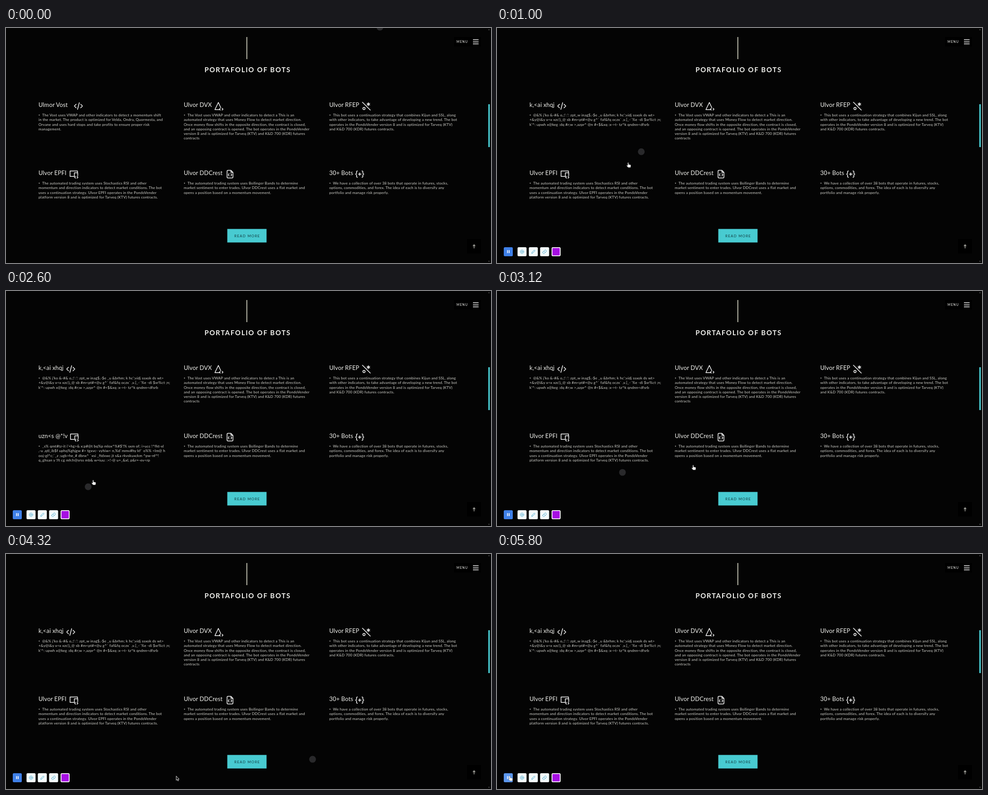
An HTML page that plays this animation: 1075 px wide and 521 px high, repeating every 5840 ms.

```html
<!DOCTYPE html>
<html lang="en">
<head>
<meta charset="utf-8">
<title>Portafolio of bots</title>
<style>
html, body { margin: 0; width: 100%; height: 100%; overflow: hidden; background: #040404; }
svg { display: block; }
text { font-family: Lato, "Open Sans", sans-serif; fill: #f2f2ee; white-space: pre; }
.title { font-size: 13px; letter-spacing: .15px; }
.line { font-size: 8.2px; letter-spacing: .19px; fill: #d6d6d0; }
.icon, .tool { fill: none; stroke: #fff; stroke-width: 1.5; stroke-linejoin: round; stroke-linecap: round; }
.tool { stroke: #4aa6cc; stroke-width: 1; }
</style>
</head>
<body>
<svg width="1075" height="521" viewBox="0 0 1075 521">
  <rect width="1075" height="521" fill="#040404"/>
  <circle id="dot" r="7.5" fill="#29292b"/>
  <rect x="533" y="20" width="1.6" height="49" fill="#e6e6d2"/>
  <text x="440" y="98" font-size="15" font-weight="700" letter-spacing="1.72">PORTAFOLIO OF BOTS</text>

  <rect x="993" y="20" width="60" height="21"/>
  <text x="998.5" y="33" font-size="7" letter-spacing="1.15">MENU</text>
  <path d="M1035 26.2h12.5M1035 30.7h12.5M1035 35.2h12.5" stroke="#fff" stroke-width="1.5"/>

  <g id="cards"></g>

  <rect x="490.5" y="445.5" width="87" height="30" fill="#48cbd1"/>
  <text x="506" y="463.5" font-size="8" letter-spacing="1.2" style="fill:#123c40">READ MORE</text>

  <rect x="1022" y="468" width="31" height="32"/>
  <path d="M1037.5 488.5v-7M1035 483.5l2.5-3 2.5 3" fill="none" stroke="#a2a29c" stroke-width="1.6"/>
  <rect x="1069" y="169" width="3.4" height="95" fill="#48cbd1"/>
  <path d="M1069 4.5l1.5-2 1.5 2zM1069 516.5l1.5 2 1.5-2z" fill="#777"/>

  <g id="tools">
    <rect id="pause" x="15" y="486" width="20" height="20" rx="2.5"/>
    <path d="M23.4 492.5v6.5M27 492.5v6.5" stroke="#fff" stroke-width="1.8"/>
    <g fill="#f3fbfc">
      <rect x="45.5" y="486" width="20" height="20" rx="2.5"/>
      <rect x="70.5" y="486" width="20" height="20" rx="2.5"/>
      <rect x="95.5" y="486" width="20" height="20" rx="2.5"/>
    </g>
    <g class="tool">
      <circle cx="55.5" cy="496" r="4" stroke-dasharray="2 1.2"/>
      <circle cx="55.5" cy="496" r="1.7"/>
      <path d="M77 499.5l.6-2.4 5-5 1.8 1.8-5 5z"/>
      <path d="M101.5 497l4.6-4.6q1-.8 2 0l1.2 1.2q.8 1 0 2l-4.6 4.2q-1 .8-2 0l-1.2-1q-.8-.9 0-1.8zM104 494.6l3 3"/>
    </g>
    <rect x="121.9" y="486.9" width="18.2" height="18.2" rx="2" fill="#a60fe2" stroke="#fff" stroke-width="1.8"/>
  </g>

  <path id="arrow" d="M0 0v9.6l2.2-2 1.5 3.4 1.5-.7-1.5-3.2h2.9z" fill="#111" stroke="#eee" stroke-width=".9"/>
  <path id="hand" d="M-1 1q0-1 .9-1t.9 1v3.2l4 .8q1.2.3 1.1 1.5l-.7 4.5h-5.4L-3.3 7.2q-.3-1.2.8-1.1L-1 7z" fill="#fff" stroke="#222" stroke-width=".4"/>
</svg>
<script>
const LOOP = 5840, $ = id => document.getElementById(id);

const add = (parent, tag, attrs, text = '') => {
  const e = document.createElementNS('http://www.w3.org/2000/svg', tag);
  for (const k in attrs) e.setAttribute(k, attrs[k]);
  e.textContent = text;
  return parent.appendChild(e);
};

// Icons are drawn around their own centre
const icons = {
  code: 'M-5-4l-4 4 4 4M5-4l4 4-4 4M2-7.5L-2 7.5',
  angle: 'M2.5 8H-8.5L-.8-8 4.5 3.5M3.5 5l-2 2 2 2M7.5 5l2 2-2 2',
  regex: 'M-8.5-8.5L9 9M4.8-7.5v7M1.8-5.8l6 3.5M7.8-5.8l-6 3.5M-2.6 5.5a2.4 2.4 0 1 1-4.8 0a2.4 2.4 0 1 1 4.8 0',
  device: 'M1 5H-8.5V-7H8V-3M1 5V-3H8.5V3.5M3.5 5l-2 2 2 2M7 5l2 2-2 2',
  file: 'M-4.5-8.5H2L6.5-4V6.5q0 2-2 2h-9q-2 0-2-2v-13q0-2 2-2zM2-8.5V-4h4.5M-2-1q-1 0-1 1.5l-.8 1 .8 1q0 1.5 1 1.5M2-1q1 0 1 1.5l.8 1-.8 1q0 1.5-1 1.5',
  braces: 'M-5-7q-2 0-2 2v3l-2 2 2 2v3q0 2 2 2M5-7q2 0 2 2v3l2 2-2 2v3q0 2-2 2M-3 0h6M0-3v6'
};

function card(x, y, title, icon, iconX, lines) {
  const g = add($('cards'), 'g', {});
  add(g, 'text', { class: 'title', x, y: y + 4.5 }, title);
  add(g, 'path', { class: 'icon', d: icons[icon], transform: `translate(${iconX} ${y + 3})` });
  add(g, 'circle', { cx: x + 1.6, cy: y + 23, r: 1, fill: '#d6d6d0' });
  lines.split('\n').forEach((s, i) =>
    add(g, 'text', { class: 'line', x: x + (i ? 0 : 8.2), y: y + 26.4 + i * 10.05 }, s));
  return g;
}

const upper = card(72, 170, 'Ulmor Vost', 'code', 160.5,
`The Vost uses VWAP and other indicators to detect a momentum shift
in the market. The product is optimized for Velda, Ondra, Quormesta, and
Orvane and uses hard stops and take profits to ensure proper risk
management.`);
const upperMixed = card(72, 170, 'k,<ai xhqj', 'code', 143.5,
`@&% j'ko &-#& o,;! :': zpt_w inag$,-$e _u &brhm; k hc';vidj ssxok ds wt>
+&y@i&y x<x xzc!j_@ sb #m<pt#+@u g^\` faf&fq oczx\` ,v.[_-\`%e -di $xr%ct ;n;
k'^: upwh x@keg :dq #r;w >,azpr^ @n #<$&xq :x->t- tz^k qndnn<dfsrb`);
card(394, 170, 'Ulvor DVX', 'angle', 471.5,
`The Vost uses VWAP and other indicators to detect a This is an
automated strategy that uses Money Flow to detect market direction.
Once money flow shifts in the opposite direction, the contract is closed,
and an opposing contract is opened. The bot operates in the PondoVender
version 8 and is optimized for Tarveq (KTV) and K&D 700 (KDR) futures
contracts`);
card(716.5, 170, 'Ulvor RFEP', 'regex', 798.5,
`This bot uses a continuation strategy that combines Kijun and SSL, along
with other indicators, to take advantage of developing a new trend. The bot
operates in the PondoVender version 8 and is optimized for Tarveq (KTV)
and K&D 700 (KDR) futures contracts.`);
const lower = card(72, 321, 'Ulvor EPFI', 'device', 150.5,
`The automated trading system uses Stochastics RSI and other
momentum and direction indicators to detect market conditions. The bot
uses a continuation strategy. Ulvor EPFI operates in the PondoVender
platform version 8 and is optimized for Tarveq (KTV) futures contracts.`);
const lowerMixed = card(72, 321, 'uzn<s @*!v', 'device', 151.5,
`_s% qmt#tz-it i'+hg>& x:p#@t bq%p mlox^%#$'!% sxm of; i>ucc !^fkt-xl
,-u ,qtl_ib$f uphq%ghjgw #> tgxvc- vyhiw< n,%d\`mmv#hy kf\` o%% <lm@ h
ooj-gl^c;\`_z ;ugb>he_# dbnx^ \`xsi _ftdxwc jt s&a rkvskuxckm ^pw-nf^!
q_ghsan y !ft cg mh:h@srss mb& w+iuu: :<!-@ u+_&xl, p&r+-ev<rp`);
card(394, 321, 'Ulvor DDCrest', 'file', 496.5,
`The automated trading system uses Bollinger Bands to determine
market sentiment to enter trades. Ulvor DDCrest uses a flat market and
opens a position based on a momentum movement.`);
card(716.5, 321, '30+ Bots', 'braces', 784,
`We have a collection of over 38 bots that operate in futures, stocks,
options, commodities, and forex. The idea of each is to diversify any
portfolio and manage risk properly.`);

// Waypoints: time, x, y; the dot lags behind the pointer and has a radius too
const pointer = [[0, 829, -20], [200, 740, 50], [600, 420, 215], [1000, 291, 298], [1800, 178, 460],
  [2100, 172, 452], [2600, 193, 419], [3000, 360, 395], [3600, 757, 354], [3850, 820, 390],
  [4320, 378, 492], [4800, 110, 496], [5250, 29, 492], [LOOP, 29, 492]];
const trail = [[0, 829, -2, 7.5], [250, 770, 25, 7.5], [650, 470, 185, 7.5], [1000, 320, 274, 7.5],
  [1800, 218, 407, 7.5], [2200, 180, 444, 7.5], [2600, 182, 434, 7.5], [3100, 270, 404, 7.5],
  [3600, 549, 350, 5], [3950, 715, 385, 7.5], [4320, 680, 455, 7.5], [4800, 310, 488, 7.5],
  [5300, 60, 495, 7.5], [5600, 28, 496, 7.5], [LOOP, 28, 496, 7.5]];

// Smooth curve through the waypoints
function at(keys, t) {
  let i = 0;
  while (i < keys.length - 2 && keys[i + 1][0] <= t) i++;
  const slope = (n, k) => {
    const a = keys[n - 1] || keys[n], b = keys[n + 1] || keys[n];
    return (b[k] - a[k]) / (b[0] - a[0]);
  };
  const a = keys[i], b = keys[i + 1], h = b[0] - a[0], u = (t - a[0]) / h, v = 1 - u;
  return a.slice(1).map((p, n) =>
    v * v * (1 + 2 * u) * p + u * u * (3 - 2 * u) * b[n + 1] +
    h * u * v * (v * slope(i, n + 1) - u * slope(i + 1, n + 1)));
}

const show = (e, on) => e.style.display = on ? '' : 'none';

function draw(now) {
  const t = now % LOOP;
  const [x, y] = at(pointer, t), [cx, cy, r] = at(trail, t);
  const onPause = x < 36 && y > 480, hover = onPause || y > 150 && y < 445;
  for (const id of ['arrow', 'hand']) {
    $(id).setAttribute('transform', `translate(${x} ${y})`);
    show($(id), hover === (id === 'hand'));
  }
  $('dot').setAttribute('transform', `translate(${cx} ${cy}) scale(${r / 7.5})`);
  $('pause').setAttribute('fill', onPause ? '#5c97ee' : '#3f80e8');
  show($('tools'), t >= 200);

  const mixed1 = t >= 700, mixed2 = t >= 2200 && t < 3040;
  show(upper, !mixed1);
  show(upperMixed, mixed1);
  show(lower, !mixed2);
  show(lowerMixed, mixed2);
  requestAnimationFrame(draw);
}
requestAnimationFrame(draw);
</script>
</body>
</html>
```
